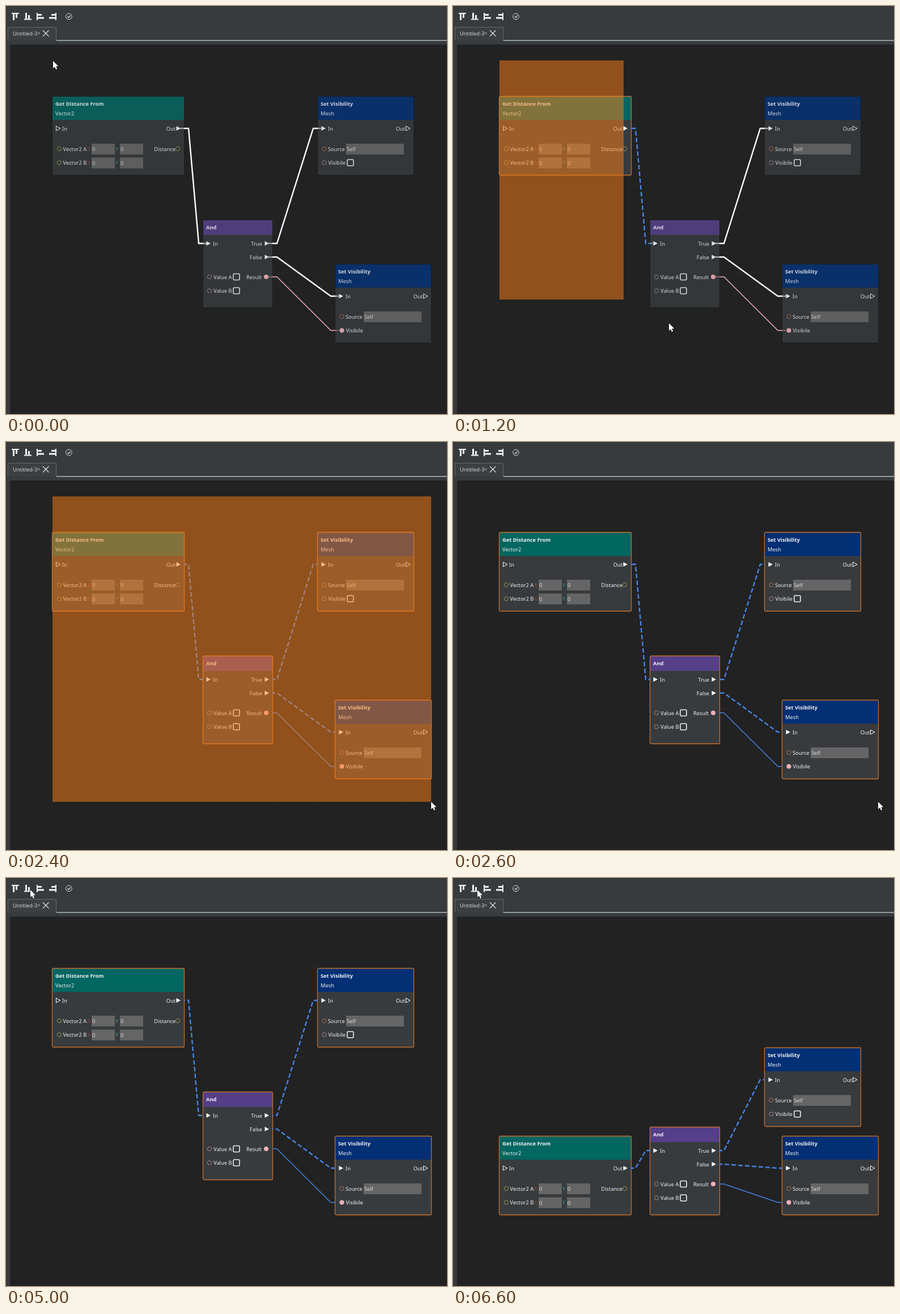
An HTML page with a canvas for the animation above (6.8 s loop, 778x720 px).

```html
<!DOCTYPE html>
<html lang="en">
<head>
<meta charset="utf-8">
<title>Node alignment</title>
<style>
  html, body { margin: 0; width: 100%; height: 100%; overflow: hidden; background: #222223; }
  canvas { display: block; }
</style>
</head>
<body>
<canvas width="778" height="720"></canvas>
<script>
const ctx = document.querySelector('canvas').getContext('2d');
const LOOP = 6800, STEP = 200, ALIGN_AT = 5600, RELEASE_AT = 2600, MARQUEE_LAG = 110;
const FONT = '9.3px "Noto Sans", sans-serif';
const PANEL = '#373b3e', BLUE = '#4784e4', PINK = '#f2b1b8', RING = '#a98a88';

// Pointer path: time, x, y
const POINTER = [
  [0, 83, 97], [400, 83, 97], [700, 130, 260], [900, 200, 400], [1090, 301, 518],
  [1200, 381, 560], [1490, 569, 626], [1600, 598, 621], [2000, 735, 636], [2290, 750, 635],
  [2700, 750, 635], [3100, 500, 390], [3600, 176, 126], [4300, 65, 42], [4800, 43, 21]
];

function pointerAt(t) {
  const i = POINTER.findIndex(key => key[0] > t);
  if (i < 0) return POINTER.at(-1).slice(1);
  const [t0, x0, y0] = POINTER[Math.max(i - 1, 0)], [t1, x1, y1] = POINTER[i];
  const k = Math.max(0, (t - t0) / (t1 - t0));
  return [x0 + (x1 - x0) * k, y0 + (y1 - y0) * k];
}

function box(x, y, w, h, color) {
  ctx.fillStyle = color;
  ctx.fillRect(x, y, w, h);
}

function text(str, x, y, { color = '#f2f2f2', align = 'left', bold = false } = {}) {
  ctx.font = (bold ? 'bold ' : '') + FONT;
  ctx.textAlign = align;
  ctx.fillStyle = color;
  ctx.fillText(str, x, y);
}

function line(points, color, width) {
  ctx.beginPath();
  points.forEach(([x, y]) => ctx.lineTo(x, y));
  ctx.strokeStyle = color;
  ctx.lineWidth = width;
  ctx.stroke();
}

function arrow(x, y, filled) {
  ctx.beginPath();
  ctx.moveTo(x - 3.5, y - 4);
  ctx.lineTo(x + 4, y);
  ctx.lineTo(x - 3.5, y + 4);
  ctx.closePath();
  ctx.fillStyle = ctx.strokeStyle = '#fff';
  ctx.lineWidth = 1;
  filled ? ctx.fill() : ctx.stroke();
}

function port(x, y, color, filled) {
  ctx.beginPath();
  ctx.arc(x, y, filled ? 4 : 3.6, 0, 7);
  ctx.fillStyle = ctx.strokeStyle = color;
  ctx.lineWidth = 1;
  filled ? ctx.fill() : ctx.stroke();
}

function checkbox(x, y) {
  ctx.beginPath();
  ctx.roundRect(x - 5.5, y - 5.5, 11, 11, 2);
  ctx.strokeStyle = '#eee';
  ctx.lineWidth = 1.6;
  ctx.stroke();
}

function field(x, y, w, value) {
  box(x, y - 9, w, 19, '#656565');
  text(value, x + 1, y + 4, { color: '#dcdcdc' });
}

const label = (str, x, y) => text(str, x, y + 3.5);
const labelRight = (str, x, y) => text(str, x, y + 3.5, { align: 'right' });

function distanceBody() {
  arrow(10, 56, false); label('In', 17, 56);
  labelRight('Out', 217, 56); arrow(222, 56, true);
  ['A', 'B'].forEach((name, i) => {
    const y = 92 + i * 24.5;
    port(12, y, '#98994f');
    label('Vector2 ' + name, 18.5, y);
    text('X', 61, y + 3.5, { color: '#99452c' });
    text('Y', 111, y + 3.5, { color: '#369196' });
    field(69, y, 41, '0');
    field(119, y, 41, '0');
  });
  labelRight('Distance', 217, 92); port(221, 92, '#98994f');
}

function andBody() {
  arrow(9, 41, true); label('In', 17, 41);
  labelRight('True', 104, 41); arrow(112, 41, true);
  labelRight('False', 104, 65); arrow(112, 65, true);
  ['A', 'B'].forEach((name, i) => {
    const y = 100 + i * 24.5;
    port(11, y, RING);
    label('Value ' + name, 18, y);
    checkbox(58.5, y);
  });
  labelRight('Result', 103, 100); port(111, 100, PINK, true);
}

function visibilityBody(linked) {
  arrow(10, 56, true); label('In', 18, 56);
  labelRight('Out', 154, 56); arrow(159, 56, false);
  port(11.5, 92, '#b0714f'); label('Source', 18, 92); field(50, 92, 102, 'Self');
  port(11.5, 116.5, linked ? PINK : RING, linked); label('Visibile', 18.5, 116.5);
  if (!linked) checkbox(57.5, 116.5);
}

const nodes = [
  { x: 82, y: 160, w: 232, h: 138, drop: 296.5, head: 41, color: '#026661', title: 'Get Distance From', sub: 'Vector2', body: distanceBody },
  { x: 348, y: 378, w: 122, h: 154, drop: 62.5, head: 26, color: '#543f88', title: 'And', body: andBody },
  { x: 550, y: 160, w: 169, h: 138, drop: 140.5, head: 41, color: '#032f74', title: 'Set Visibility', sub: 'Mesh', body: () => visibilityBody(false) },
  { x: 581, y: 456.5, w: 169, h: 138, drop: 0, head: 41, color: '#032f74', title: 'Set Visibility', sub: 'Mesh', body: () => visibilityBody(true) }
];
const [distance, and, upper, lower] = nodes;

// Port heights are relative to the node top
const links = [
  { from: distance, fromY: 56, to: and, toY: 41 },
  { from: and, fromY: 41, to: upper, toY: 56 },
  { from: and, fromY: 65, to: lower, toY: 56 },
  { from: and, fromY: 100, to: lower, toY: 116.5, data: true }
];

function drawNode(n) {
  ctx.save();
  ctx.translate(n.x, n.top);
  ctx.globalAlpha = n.selected ? 1 : 0.85;
  box(0, 0, n.w, n.h, PANEL);
  box(0, 0, n.w, n.head, n.color);
  text(n.title, 5, 16, { bold: true });
  if (n.sub) text(n.sub, 5, 32.5);
  n.body();
  ctx.beginPath();
  ctx.roundRect(-0.5, -0.5, n.w + 1, n.h + 1, 2);
  ctx.strokeStyle = n.selected ? '#c46f2c' : '#1b1c1c';
  ctx.lineWidth = n.selected ? 1.3 : 1;
  ctx.stroke();
  ctx.restore();
}

function drawLink({ from, fromY, to, toY, data }, t) {
  const y0 = from.top + fromY, y1 = to.top + toY, x0 = from.x + from.w, x1 = to.x;
  const active = from.selected || to.selected;
  const color = active ? BLUE : data ? PINK : '#fff', width = data ? 1.4 : 2.4;
  if (active && !data) {
    ctx.setLineDash([8, 4]);
    ctx.lineDashOffset = 8 - 12 * (t / 700 % 1);
  }
  line([[x0, y0], [x0 + 8, y0], [x1 - 8, y1], [x1, y1]], color, width);
  ctx.setLineDash([]);
  ctx.globalAlpha = 0.55;
  const stub = active ? '#b8b8b8' : color;
  if (!from.selected) line([[x0 - 7, y0], [x0, y0]], stub, width);
  if (!to.selected) line([[x1, y1], [x1 + 6, y1]], stub, width);
  ctx.globalAlpha = 1;
}

function drawGrid() {
  for (let i = 0; i < 10; i++) {
    const at = Math.round(80 + i * 78.2);
    box(7, at, 771, 1, 'rgba(255,255,255,.02)');
    box(at + 2, 68, 1, 652, 'rgba(255,255,255,.008)');
  }
}

function drawChrome() {
  box(0, 0, 778, 68, PANEL);
  box(0, 68, 7, 652, PANEL);
  box(89, 60, 689, 1.5, '#b4b7b9');
  box(3, 37, 85, 24, '#3b3f42');
  line([[3.5, 61], [3.5, 37.5], [88.5, 37.5], [88.5, 61]], '#64686a', 1);
  text('Untitled-3^', 12, 52, { color: '#d4d6d7' });
  line([[65, 43], [75.5, 53.5]], '#d4d6d7', 1.4);
  line([[75.5, 43], [65, 53.5]], '#d4d6d7', 1.4);

  const bars = [
    [10, 12, 13, 2], [12, 14, 3, 11], [17, 14, 3, 7],
    [32, 22.5, 13, 2], [34, 12, 3, 10.5], [39, 16, 3, 6.5],
    [54, 12, 2, 13], [56, 14, 7, 3], [56, 19.5, 11, 3],
    [87, 12, 2, 13], [80, 14, 7, 3], [76, 19.5, 11, 3]
  ];
  bars.forEach(bar => box(...bar, '#f4f4f4'));
  port(111, 18.5, '#d8dadb');
  ctx.beginPath();
  ctx.arc(111, 18.5, 5.3, 0, 7);
  ctx.fillStyle = PANEL;
  ctx.fill();
  ctx.stroke();
  line([[108.5, 18.5], [110.5, 20.5], [114, 16.5]], '#d8dadb', 1.2);
}

function drawPointer(x, y) {
  ctx.save();
  ctx.translate(x, y);
  ctx.beginPath();
  [[0, 0], [0, 13], [3, 10.3], [5, 15], [7.2, 14], [5.2, 9.5], [9.3, 9.3]].forEach(p => ctx.lineTo(...p));
  ctx.closePath();
  ctx.lineWidth = 1.2;
  ctx.strokeStyle = '#111';
  ctx.stroke();
  ctx.fillStyle = '#fff';
  ctx.fill();
  ctx.restore();
}

function draw(t) {
  const [right, bottom] = pointerAt(Math.min(t, RELEASE_AT) - MARQUEE_LAG);
  nodes.forEach(n => {
    n.selected = right > n.x + 1 && bottom > n.y;
    n.top = Math.floor(n.y + (t >= ALIGN_AT ? n.drop : 0));
  });
  box(0, 0, 778, 720, '#222223');
  drawGrid();
  nodes.forEach(drawNode);
  links.forEach(link => drawLink(link, t));
  if (t > 400 && t < RELEASE_AT) box(82, 96, right - 82, bottom - 96, 'rgba(255,128,22,.5)');
  drawChrome();
  drawPointer(...pointerAt(t));
}

function tick(now) {
  draw(Math.floor(now % LOOP / STEP) * STEP);
  requestAnimationFrame(tick);
}
requestAnimationFrame(tick);
</script>
</body>
</html>
```
